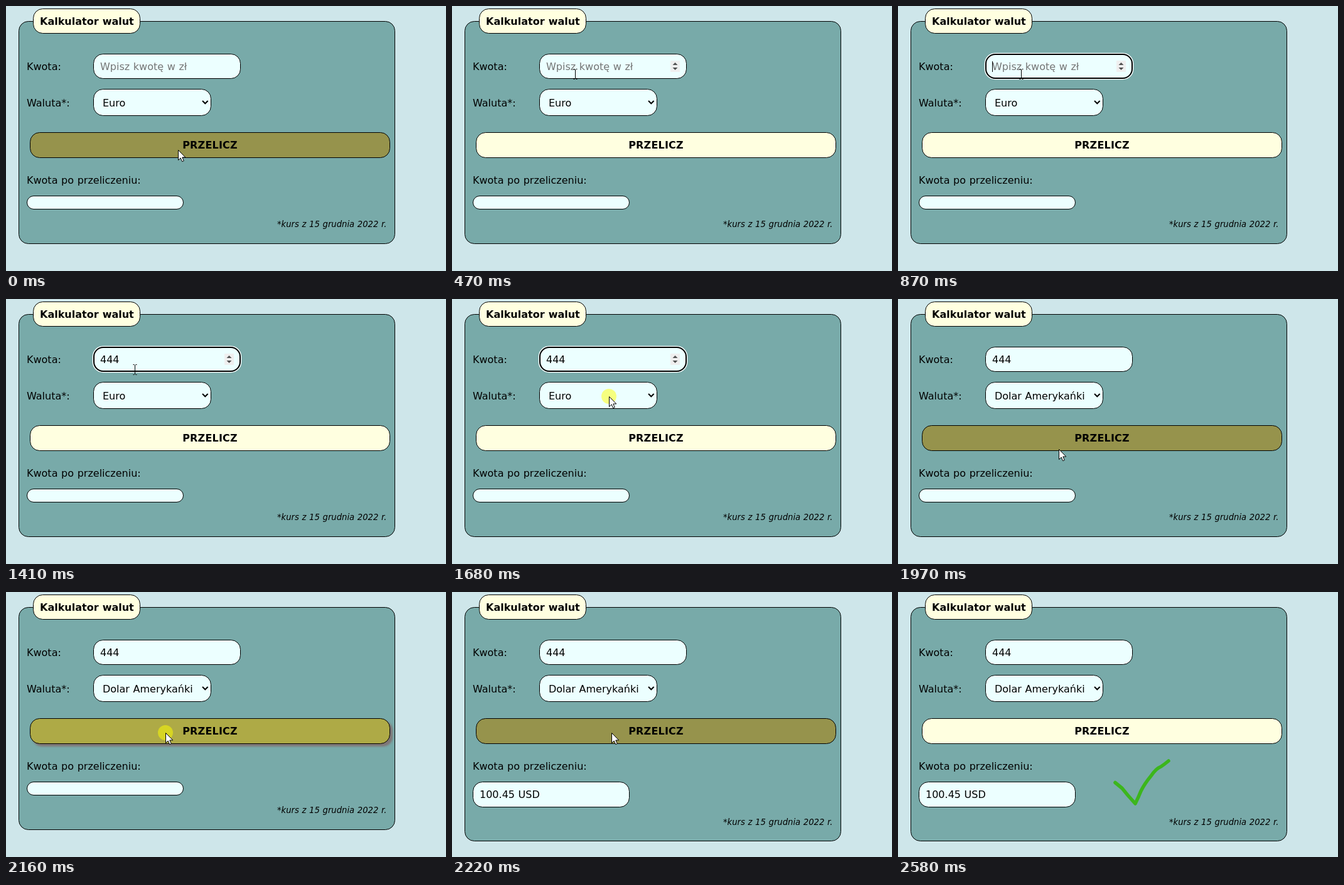
Animation of 701 by 422 pixels, one loop 2640 ms. Source, as an HTML page:

```html
<!DOCTYPE html>
<html lang="pl">
<head>
<meta charset="utf-8">
<title>Kalkulator walut</title>
<style>
  html, body { margin: 0; width: 100%; height: 100%; overflow: hidden; background: #cee6ea; }
  svg { display: block; width: 701px; height: 422px; }
  text { font: 16px "DejaVu Sans", sans-serif; word-spacing: .034em; white-space: pre; }
  .bold { font-weight: bold; }
  .box { stroke: #000; }
  .field { fill: #ecffff; }
  .cream { fill: #ffffe0; }
  #note { font-size: 13.2px; font-style: italic; }
  #button text { letter-spacing: .2px; text-anchor: middle; }
  #shadow { fill: #7f7676; filter: blur(1.5px); }
  #listShadow { fill: #000; opacity: .4; filter: blur(2px); }
</style>
</head>
<body>
<svg viewBox="0 0 701 422">
  <rect width="701" height="422" fill="#cee6ea"/>
  <rect id="panel" class="box" x="20.5" y="24.5" width="599" height="354" rx="15" fill="#78aaa9"/>
  <rect class="box cream" x="43.5" y="4.5" width="170" height="39" rx="15"/>
  <text class="bold" x="54" y="30">Kalkulator walut</text>

  <text x="33" y="102">Kwota:</text>
  <rect id="ring" x="138.5" y="75.5" width="236" height="41" rx="16" fill="none" stroke="#fff" stroke-width="1.5"/>
  <rect id="input" class="box field" x="139.5" y="76.5" width="234" height="39" rx="15"/>
  <text id="amount" x="150" y="102"></text>
  <path id="caret" d="M150.5 88v17" stroke="#000"/>
  <g id="spinner">
    <rect x="348" y="87" width="15" height="18" fill="#efefef"/>
    <path d="M351.5 94l4-4 4 4zM351.5 98l4 4 4-4z" fill="#505050"/>
  </g>

  <text x="33" y="160">Waluta*:</text>
  <rect class="box field" x="139.5" y="132.5" width="187" height="42" rx="15"/>
  <text id="choice" x="154" y="160"></text>
  <path d="M313 151l4.3 4.3 4.3-4.3" fill="none" stroke="#000" stroke-width="2"/>

  <g id="button">
    <rect id="shadow" x="42" y="205" width="574" height="41" rx="15"/>
    <rect id="face" class="box" x="38.5" y="201.5" width="573" height="40" rx="15"/>
    <text class="bold" x="325" y="227">PRZELICZ</text>
  </g>

  <text x="33" y="283">Kwota po przeliczeniu:</text>
  <rect id="result" class="box field" x="33.5" y="302.5" width="249" height="21"/>
  <text id="sum" x="44" y="328">100.45 USD</text>
  <text id="note" x="432" y="352">*kurs z 15 grudnia 2022 r.</text>

  <g id="list">
    <rect id="listShadow" x="142" y="178" width="187" height="83"/>
    <rect class="field" x="139.5" y="175.5" width="187" height="82" stroke="#767676"/>
    <rect id="mark" x="140" width="186" height="20.5" fill="#0090ff"/>
  </g>

  <path id="tick" fill="none" stroke="#3cb61c" stroke-width="5.5" stroke-linecap="round" stroke-linejoin="round"/>

  <g id="cursor">
    <circle id="click" r="12" fill="#ff0" fill-opacity=".5"/>
    <path id="arrow" d="M.5 .5v16l3.7-3.5 2.5 5.7 2.6-1.1-2.5-5.6h5z" fill="#fff" stroke="#000"/>
    <path id="beam" d="M-2.5-7.5h2M1.5-7.5h2M.5-7v15M-2.5 8.5h2M1.5 8.5h2" fill="none" stroke="#000"/>
  </g>
</svg>
<script>
const LOOP = 2640;
const OPTIONS = ['Euro', 'Funt Brytyjski', 'Korona Norweska', 'Dolar Amerykańki'];
const DOWN = 'M346 303.5l11 9 9 11 12 13.5';
const UP = 'q5-10 9-20 6-12 16-24 8-12 16-15 6-4 12-9';

// time, cursor x, y, pointer shape (a: arrow, i: text beam, -: none), clicking
const path = [
  [0, 274, 229, 'a'], [70, 250, 168, 'a'],
  [210, 232, 146, 'a'], [270, 216, 128, 'a'], [340, 206, 118, 'a'],
  [400, 200, 112, 'i'], [470, 196, 108, 'i'],
  [720, 196, 108, 'i', 1], [870, 196, 108, 'i'],
  [1410, 205, 112, 'i'], [1480, 219, 113, 'i'], [1550, 235, 130, 'a'],
  [1610, 246, 148, 'a'], [1680, 250, 155, 'a', 1],
  [1770, 252, 180, 'a'], [1840, 255, 219, 'a'], [1910, 256, 239, 'a', 1],
  [1970, 256, 239, 'a'], [2070, 255, 230, 'a'], [2160, 254, 224, 'a', 1],
  [2220, 254, 224, 'a'], [2310, 300, 262, 'a'], [2450, 0, 0, '-']
];

const $ = id => document.getElementById(id);
const show = (id, on) => $(id).style.display = on ? '' : 'none';
const set = (id, attrs) => {
  for (const k in attrs) $(id).setAttribute(k, attrs[k]);
};

const rows = OPTIONS.map((name, i) => {
  const row = document.createElementNS('http://www.w3.org/2000/svg', 'text');
  row.textContent = name;
  set('list', {});
  row.setAttribute('x', 154);
  row.setAttribute('y', Math.round(192 + i * 20.4));
  return $('list').appendChild(row);
});

function draw(t) {
  const within = (a, b) => t >= a && t < b;
  const [, x, y, shape, clicking] = path.findLast(step => step[0] <= t);
  const focus = within(720, 1770);
  const typed = t >= 1140;
  const open = within(1770, 1970);
  const done = t >= 2220;
  const pressed = within(2160, 2220);
  const hover = t < 70 || within(1970, 2310);

  show('ring', focus);
  set('input', focus
    ? { x: 140, y: 77, width: 233, height: 38, 'stroke-width': 2 }
    : { x: 139.5, y: 76.5, width: 234, height: 39, 'stroke-width': 1 });
  $('amount').textContent = typed ? '444' : 'Wpisz kwotę w zł';
  set('amount', { fill: typed ? '#000' : '#757575' });
  show('caret', within(720, 1140));
  show('spinner', within(400, 1770));

  $('choice').textContent = OPTIONS[t < 1970 ? 0 : 3];
  show('list', open);
  const active = t < 1840 ? 0 : t < 1910 ? 2 : 3;
  set('mark', { y: 176 + active * 20.4 });
  rows.forEach((row, i) => row.setAttribute('fill', i === active ? '#fff' : '#000'));

  set('face', { fill: pressed ? '#aeaa46' : hover ? '#96934c' : '#ffffe0' });
  show('shadow', pressed);

  set('panel', { height: done ? 372 : 354 });
  set('result', { height: done ? 40 : 21, rx: done ? 15 : 10.5 });
  set('note', { y: done ? 371 : 352 });
  show('sum', done);

  show('tick', t >= 2520);
  set('tick', { d: t < 2580 ? DOWN : DOWN + UP });

  set('cursor', { transform: `translate(${x} ${y})` });
  show('click', clicking);
  show('arrow', shape === 'a');
  show('beam', shape === 'i');
}

const start = performance.now();
function frame() {
  draw((performance.now() - start) % LOOP);
  requestAnimationFrame(frame);
}
frame();
</script>
</body>
</html>
```
